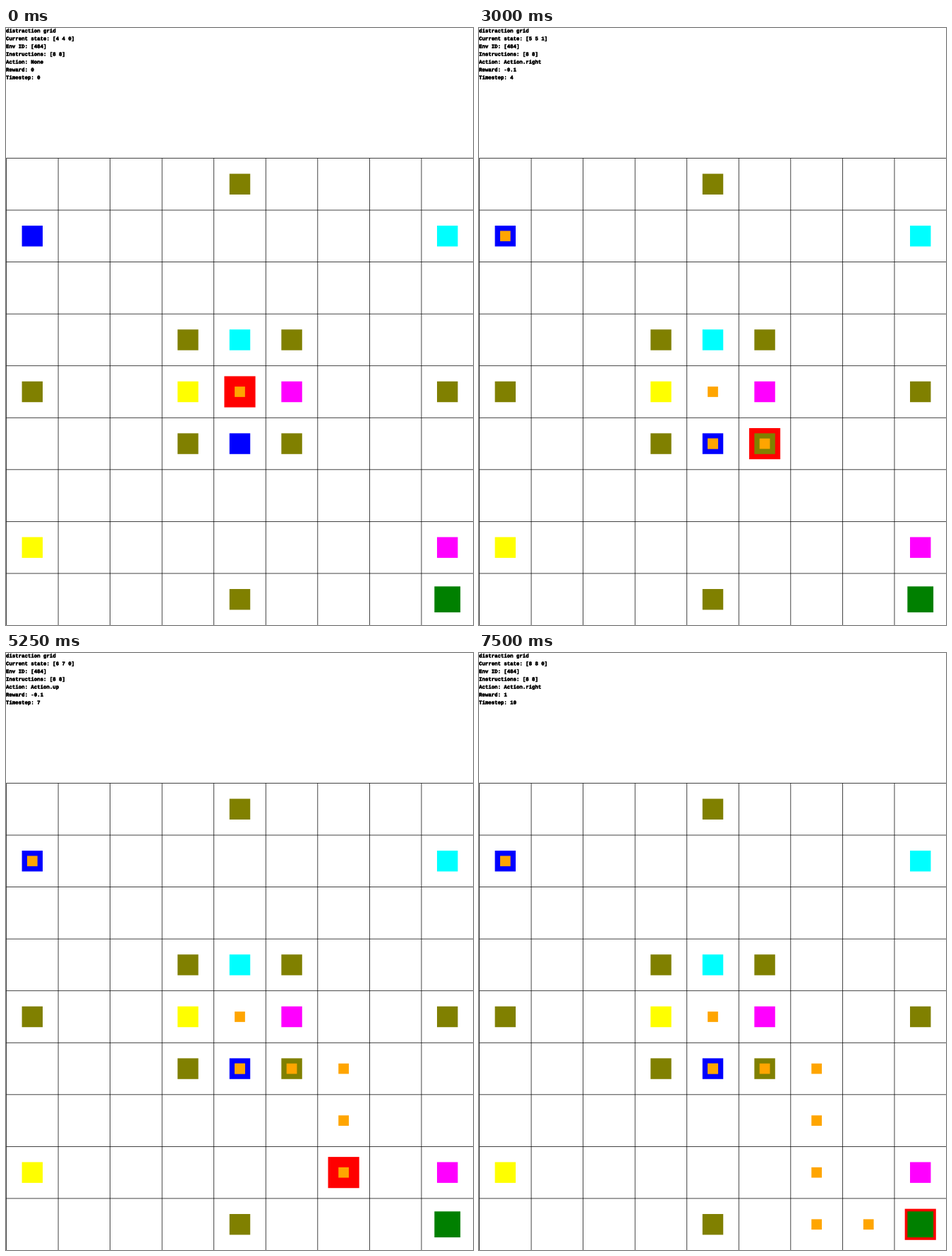
A matplotlib script that plays this animation: 662 by 846 pixels, repeating every 8250 ms.

```python
import matplotlib.pyplot as plt
from matplotlib.animation import FuncAnimation
from matplotlib.patches import Rectangle
from matplotlib.patheffects import withStroke

W, H, DPI = 662, 846, 64
N = 9
CELL = W / N
UNIT = CELL / 100  # the scene is laid out with cells of 100 units
TOP = H - W
STEP_MS = 750

STOPS = {
    "olive": [(4, 0), (3, 3), (5, 3), (0, 4), (8, 4), (3, 5), (5, 5), (4, 8)],
    "blue": [(0, 1), (4, 5)],
    "cyan": [(8, 1), (4, 3)],
    "yellow": [(3, 4), (0, 7)],
    "magenta": [(5, 4), (8, 7)],
}
GOAL = (8, 8)
START = (4, 4)
ACTIONS = ["up", "ride_bus", "ride_bus", "right", "right",
           "up", "up", "up", "right", "right"]
MOVES = {"up": (0, 1), "right": (1, 0)}
BUS = {(4, 5): (0, 1), (0, 1): (4, 5)}


def walk():
    path = [START]
    for action in ACTIONS:
        x, y = path[-1]
        if action == "ride_bus":
            path.append(BUS[x, y])
        else:
            dx, dy = MOVES[action]
            path.append((x + dx, y + dy))
    return path


PATH = walk()
STOP_CELLS = {cell for cells in STOPS.values() for cell in cells}

plt.rcParams["toolbar"] = "None"
fig = plt.figure(figsize=(W / DPI, H / DPI), dpi=DPI, facecolor="white")
ax = fig.add_axes([0, 0, 1, 1])
# Coordinates refer to pixel centres
ax.set_xlim(-0.5, W - 0.5)
ax.set_ylim(H - 0.5, -0.5)
ax.axis("off")


def points(px):
    return px * 72 / DPI


def box(cx, cy, w, h, color, z):
    return ax.add_patch(Rectangle((cx - w / 2, cy - h / 2), w, h,
                                  facecolor=color, linewidth=0,
                                  snap=False, zorder=z))


def square(cell, size, color, z):
    cx = (cell[0] + 0.5) * CELL
    cy = TOP + (cell[1] + 0.5) * CELL
    return box(cx, cy, size * UNIT, size * UNIT, color, z)


for i in range(N):
    box(i * CELL, TOP + W / 2, UNIT, W, "black", 1)
    box(W / 2, TOP + i * CELL, W, UNIT, "black", 1)

for color, cells in STOPS.items():
    for cell in cells:
        square(cell, 40, color, 3)
square(GOAL, 50, "green", 5)

agents = [square(cell, 60, "red", 2) for cell in PATH]
trail = [square(cell, 20, "orange", 4) for cell in PATH]

bold = [withStroke(linewidth=points(0.4), foreground="black")]
lines = [ax.text(-0.5, 5.8 + 15 * UNIT * k, "", family="Liberation Mono",
                 weight="bold", size=points(10 * UNIT), color="black",
                 va="baseline", path_effects=bold, zorder=6)
         for k in range(7)]


def status(step):
    x, y = PATH[step]
    at_stop = int((x, y) in STOP_CELLS)
    action = f"Action.{ACTIONS[step - 1]}" if step else "None"
    reward = "0" if step == 0 else "1" if (x, y) == GOAL else "-0.1"
    return ["distraction grid",
            f"Current state: [{x} {y} {at_stop}]",
            "Env ID: [484]",
            f"Instructions: [{GOAL[0]} {GOAL[1]}]",
            f"Action: {action}",
            f"Reward: {reward}",
            f"Timestep: {step}"]


def draw(step):
    for i, (agent, dot) in enumerate(zip(agents, trail)):
        agent.set_visible(i == step)
        dot.set_visible(i <= step)
    for line, text in zip(lines, status(step)):
        line.set_text(text)
    return agents + trail + lines


anim = FuncAnimation(fig, draw, frames=len(PATH), interval=STEP_MS,
                     repeat=True, repeat_delay=0, blit=False)
plt.show()
```
